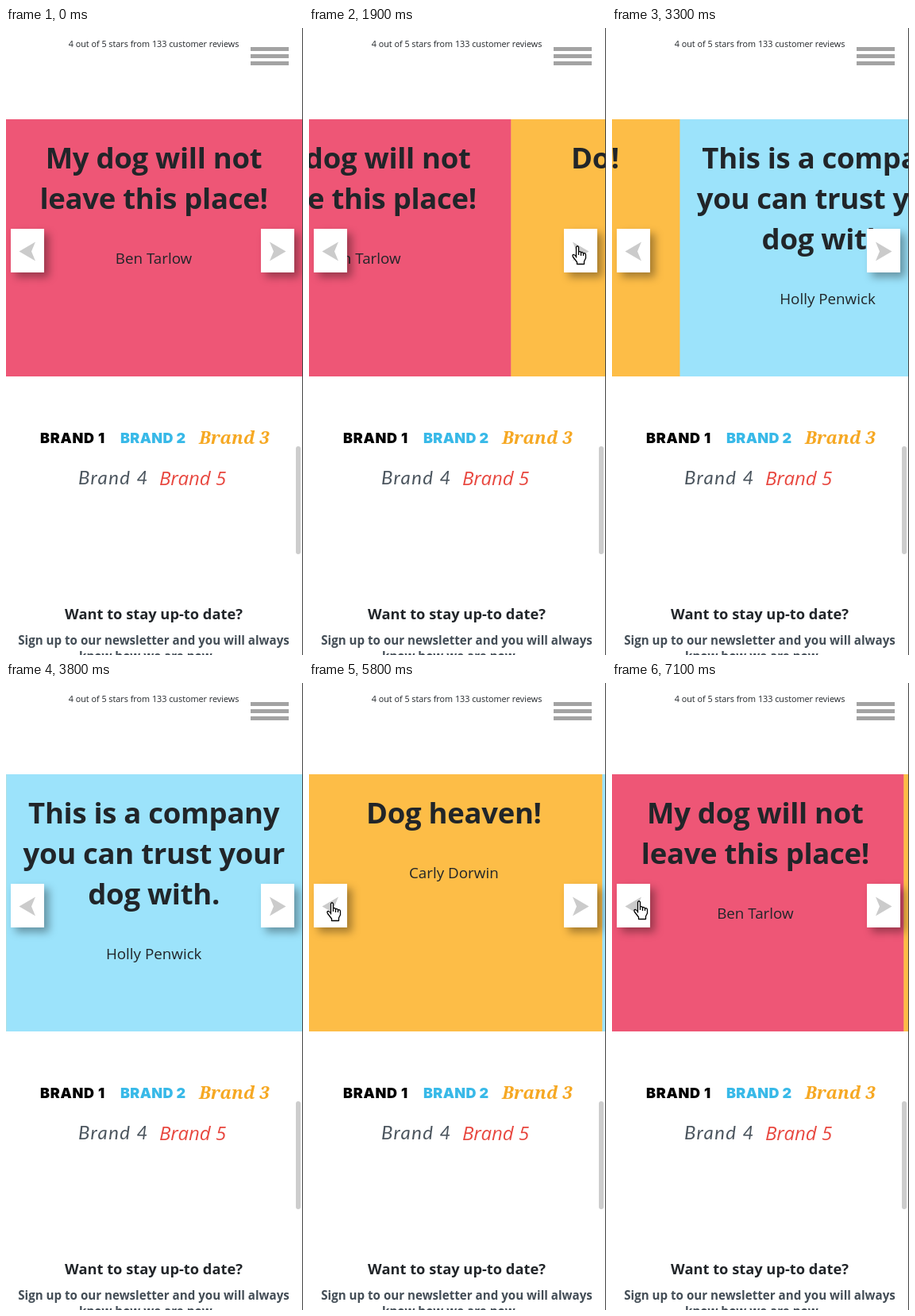
An HTML page with a canvas for the animation above (7200 ms loop, 374 px wide and 790 px high).

```html
<!DOCTYPE html>
<html lang="en">
<head>
<meta charset="utf-8">
<title>Review slider</title>
<style>
  html, body { margin: 0; width: 100%; height: 100%; overflow: hidden; background: #fff; }
  canvas { display: block; }
</style>
</head>
<body>
<canvas id="stage" width="374" height="790"></canvas>
<script>
const ctx = document.getElementById('stage').getContext('2d');
const LOOP = 7200, STEP = 100, SLIDE_TIME = 1000;
const PAGE = 373, CENTER = 186, TOP = 115, BOTTOM = 439;
const SANS = '"Open Sans", "Noto Sans", sans-serif';
const INK = '#212529';

const slides = [
  { color: '#ee5676', lines: ['My dog will not', 'leave this place!'], author: 'Ben Tarlow' },
  { color: '#fdbd47', lines: ['Dog heaven!'], author: 'Carly Dorwin' },
  { color: '#9ce3fb', lines: ['This is a company', 'you can trust your', 'dog with.'], author: 'Holly Penwick' }
];

// Start time and direction of each slide change
const moves = [[1690, 1], [2830, 1], [4930, -1], [6260, -1]];

const hand = new Path2D('M5.5 15V2Q7-.5 8.5 2V8Q10.5 6.8 11.5 9Q13.5 7.6 14.5 10' +
  'Q17.5 9 17.5 12V16L15.5 20V23.5H6.5V21L1.5 14.5Q0 11.5 2.5 11.5Q4 12 5.5 14Z' +
  'M8.5 8V12M11.5 9V13M14.5 10V13');

const clamp01 = v => Math.min(1, Math.max(0, v));
const bezier = (u, a, b) => 3 * u * (1 - u) * (1 - u) * a + 3 * u * u * (1 - u) * b + u * u * u;

// CSS "ease": cubic-bezier(.25, .1, .25, 1)
function ease(x) {
  if (x <= 0 || x >= 1) return clamp01(x);
  let lo = 0, hi = 1;
  for (let i = 0; i < 24; i++) {
    const mid = (lo + hi) / 2;
    if (bezier(mid, 0.25, 0.25) < x) lo = mid; else hi = mid;
  }
  return bezier(lo, 0.1, 1);
}

function text(str, x, y, font, color = INK, align = 'center', spacing = 0) {
  ctx.font = font;
  ctx.fillStyle = color;
  ctx.textAlign = align;
  ctx.letterSpacing = spacing + 'px';
  ctx.fillText(str, x, y);
}

function rect(x, y, w, h, color) {
  ctx.fillStyle = color;
  ctx.fillRect(x, y, w, h);
}

function drawSlide(slide, x) {
  if (x >= PAGE || x <= -PAGE) return;
  rect(x, TOP, PAGE + 0.5, BOTTOM - TOP, slide.color);
  slide.lines.forEach((line, i) =>
    text(line, x + CENTER, 177 + i * 51, '700 36.5px ' + SANS, INK, 'center', -0.3));
  text(slide.author, x + CENTER, 195 + slide.lines.length * 51, '400 18.8px ' + SANS);
}

function drawButton(x, dir) {
  ctx.save();
  ctx.shadowColor = 'rgba(0, 0, 0, .35)';
  ctx.shadowBlur = 10;
  ctx.shadowOffsetX = ctx.shadowOffsetY = 6;
  rect(x, 253, 42, 55, '#fff');
  ctx.restore();

  ctx.save();
  ctx.translate(x + 21, 281.5);
  ctx.scale(dir, 1);
  ctx.beginPath();
  ctx.moveTo(-10, -12);
  ctx.lineTo(10.5, 0);
  ctx.lineTo(-10, 12);
  ctx.lineTo(-5, 0);
  ctx.closePath();
  ctx.fillStyle = '#cbcbcb';
  ctx.fill();
  ctx.restore();
}

function drawHand(x, y) {
  ctx.save();
  ctx.translate(x, y);
  ctx.fillStyle = '#fff';
  ctx.strokeStyle = '#000';
  ctx.lineWidth = 1.3;
  ctx.lineJoin = 'round';
  ctx.fill(hand);
  ctx.stroke(hand);
  ctx.restore();
}

function drawPage() {
  rect(0, 0, 374, 790, '#fff');
  text('4 out of 5 stars from 133 customer reviews', CENTER, 24, '400 10.8px ' + SANS);
  for (let i = 0; i < 3; i++) rect(308, 24 + i * 9, 48, 5, '#a3a3a3');

  const block = '900 18px Inter, sans-serif';
  text('BRAND 1', 43, 523, block, '#000', 'left', 0.7);
  text('BRAND 2', 144, 523, block, '#38b9e8', 'left', 0.3);
  text('Brand 3', 243, 524, 'italic 700 22px "Noto Serif", serif', '#f6a823', 'left');
  text('Brand 4', 91, 575, 'italic 400 24px Lato, sans-serif', '#4c565f', 'left', 1.4);
  text('Brand 5', 193, 576, 'italic 400 24px ' + SANS, '#e8473f', 'left');

  text('Want to stay up-to date?', CENTER, 745, '700 18.3px ' + SANS);
  const small = '700 15.15px ' + SANS;
  text('Sign up to our newsletter and you will always', CENTER, 777, small, '#434d56');
  text('know how we are now.', 92, 797, small, '#434d56', 'left');
}

function drawCursor(t) {
  if (t >= 1400 && t < 2600) drawHand(331, 274);
  if (t >= 5400) {
    const k = clamp01((t - 5800) / 1300);
    drawHand(22 + 5 * k, 276 - 2 * k);
  }
}

function draw(t) {
  const scroll = PAGE * moves.reduce((sum, [start, dir]) =>
    sum + dir * ease((t - start) / SLIDE_TIME), 0);
  drawPage();
  slides.forEach((slide, i) => drawSlide(slide, i * PAGE - scroll));
  drawButton(6, -1);
  drawButton(321, 1);
  ctx.fillStyle = '#cdcdcd';
  ctx.beginPath();
  ctx.roundRect(365, 527, 6, 136, 3);
  ctx.fill();
  rect(373, 0, 1, 790, '#444');
  drawCursor(t);
}

const origin = performance.now();
function tick() {
  const t = (performance.now() - origin) % LOOP;
  draw(Math.floor(t / STEP) * STEP);
  requestAnimationFrame(tick);
}
tick();
</script>
</body>
</html>
```
